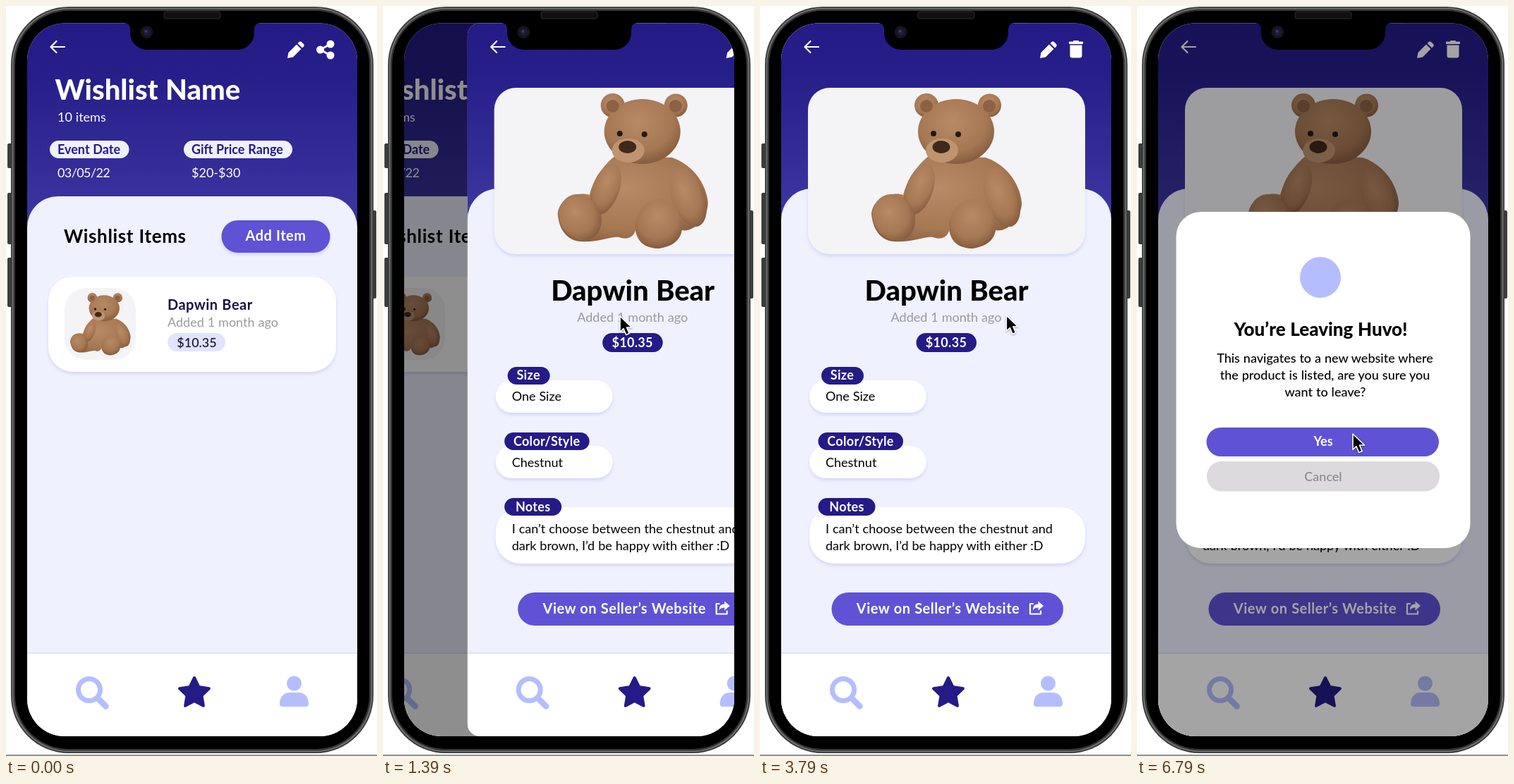
An HTML page that plays this animation: 526 by 1064 pixels, repeating every 6.82 s.

```html
<!DOCTYPE html>
<html lang="en">
<head>
<meta charset="utf-8">
<title>Wishlist app</title>
<style>
html, body { margin: 0; width: 100%; height: 100%; overflow: hidden; background: #fff; }
svg { display: block; width: 100%; height: 100%; }
text { font-family: Lato, "Open Sans", sans-serif; font-size: 18px; word-spacing: .02em; }
.b { font-weight: 700; }
.h { font-weight: 800; }
.m { font-weight: 500; }
.tag { letter-spacing: .02em; }
.t20 { font-size: 20px; letter-spacing: .024em; }
.t26 { font-size: 26px; letter-spacing: .024em; }
.t40 { font-size: 40px; }
.mid { text-anchor: middle; }
.white { fill: #fff; }
.navy { fill: #241b87; }
.ink { fill: #18123f; }
.grey { fill: #9a999c; }
.pale { fill: #eff1ff; }
.violet { fill: #5f52d5; }
.photo { fill: #f4f3f6; }
.soft { fill: #b4beff; }
.line { fill: none; stroke: #fff; stroke-linecap: round; stroke-linejoin: round; }
.lift { filter: drop-shadow(0 3px 2px rgba(85, 80, 205, .16)); }
</style>
</head>
<body>
<svg viewBox="0 0 526 1064" preserveAspectRatio="none">
<defs>
  <linearGradient id="sky" x1="0" y1="0" x2="0" y2="1">
    <stop offset="0" stop-color="#241b87"/><stop offset=".25" stop-color="#261e89"/><stop offset="1" stop-color="#3e38a4"/>
  </linearGradient>
  <radialGradient id="fur" cx=".45" cy=".35" r=".7">
    <stop offset="0" stop-color="#b98a66"/><stop offset=".65" stop-color="#a57753"/><stop offset="1" stop-color="#80563a"/>
  </radialGradient>
  <clipPath id="screen"><rect x="30" y="24.500" width="468" height="1011.500" rx="53"/></clipPath>
  <clipPath id="page"><rect x="30" y="24" width="468" height="1012" rx="18"/></clipPath>

  <g id="bear">
    <g fill="url(#fur)">
      <circle cx="236" cy="141" r="17"/><circle cx="325.500" cy="141" r="16.500"/>
      <path d="M240 212C222 226 208 248 203 268C190 263 160 270 158 295C160 318 172 333 190 334C215 336 235 326 245 328
        C262 334 268 322 268 318C272 338 285 345 305 343C325 340 333 328 334 318C350 322 372 300 371 278C368 252 350 225 320 215z"/>
      <ellipse cx="226" cy="260" rx="19" ry="38" transform="rotate(20 226 260)"/>
      <ellipse cx="343" cy="272" rx="23" ry="43" transform="rotate(-20 343 272)"/>
      <ellipse cx="190" cy="300" rx="29" ry="34" transform="rotate(-28 190 300)"/>
      <ellipse cx="300.500" cy="309" rx="32" ry="35" transform="rotate(14 300 309)"/>
      <ellipse cx="278" cy="178" rx="54" ry="46"/>
    </g>
    <circle cx="236" cy="142" r="9" fill="#8c6144"/><circle cx="325" cy="142" r="9" fill="#8c6144"/>
    <ellipse cx="258" cy="205" rx="23" ry="17" fill="#c0946f"/>
    <ellipse cx="257" cy="200" rx="12.500" ry="9" fill="#3f291d"/>
    <circle cx="246" cy="181" r="4" fill="#231914"/><circle cx="281" cy="182" r="4" fill="#231914"/>
  </g>

  <path id="back" class="line" stroke-width="2.200" d="M83 58H64M71.500 50L63.500 58l8 8"/>
  <g id="pencil" class="white">
    <path d="M0 24l1.500-8L13 4.500l6.500 6.500L8 22.500z"/>
    <path d="M14.500 3l2-2a2.500 2.500 0 0 1 3.500 0l3 3a2.500 2.500 0 0 1 0 3.500l-2 2z"/>
  </g>
  <g id="nav">
    <rect x="30" y="917" width="468" height="119" class="white"/>
    <rect x="30" y="917" width="468" height="2" fill="#dfe2fb"/>
    <circle cx="118" cy="970" r="15.500" fill="none" stroke="#b4beff" stroke-width="7"/>
    <path d="M130 982l11.500 11.500" stroke="#b4beff" stroke-width="8.500" stroke-linecap="round"/>
    <path transform="translate(267 975)" class="navy" stroke="#241b87" stroke-width="4" stroke-linejoin="round"
      d="M0-22L6.500-8.900 20.900-6.800 10.500 3.400 12.900 17.800 0 11-12.900 17.800-10.500 3.400-20.900-6.800-6.500-8.900z"/>
    <circle cx="408.500" cy="961" r="10.500" class="soft"/>
    <path class="soft" d="M388 990c0-10 6-16 14-16h13c8 0 14 6 14 16q0 4-4 4h-33q-4 0-4-4z"/>
  </g>
</defs>

<!-- phone body -->
<g>
  <rect y="1062" width="526" height="2" fill="#929292"/>
  <g fill="#3b3d3d">
    <rect x="2" y="195" width="7" height="35" rx="2"/><rect x="2" y="265" width="7" height="73" rx="2"/>
    <rect x="2" y="357" width="7" height="70" rx="2"/><rect x="519" y="290" width="6" height="125" rx="2"/>
  </g>
  <rect x="7" y="1" width="514" height="1059" rx="82" fill="#343635"/>
  <rect x="9.500" y="3.500" width="509" height="1054" rx="80" fill="none" stroke="#70716e" stroke-width="2"/>
  <rect x="13" y="7" width="502" height="1047" rx="76"/>
  <rect x="224" y="8" width="80" height="10" rx="3" fill="#101011" stroke="#2d2d2f"/>
</g>

<g clip-path="url(#screen)">
  <g id="list">
    <rect x="30" y="24" width="468" height="1012" class="pale"/>
    <rect x="30" y="24" width="468" height="296" fill="url(#sky)"/>
    <path class="pale" d="M30 314a44 44 0 0 1 44-44h380a44 44 0 0 1 44 44v604H30z"/>
    <use href="#back"/>
    <use href="#pencil" x="399" y="50"/>
    <g class="white">
      <circle cx="460" cy="54" r="5.500"/><circle cx="445.500" cy="62" r="5.500"/><circle cx="460" cy="70" r="5.500"/>
      <path class="line" stroke-width="3" d="M460 54l-14.500 8 14.500 8"/>
      <text x="69.500" y="133" class="h t40">Wishlist Name</text>
      <text x="73" y="164">10 items</text>
      <text x="73" y="243" letter-spacing="-.6">03/05/22</text>
      <text x="263" y="243">$20-$30</text>
    </g>
    <rect x="62" y="191" width="112.500" height="25" rx="12.500" class="pale"/>
    <rect x="252" y="191" width="154" height="25" rx="12.500" class="pale"/>
    <text x="73" y="210" class="b navy">Event Date</text>
    <text x="263" y="210" class="b navy">Gift Price Range</text>
    <text x="82" y="336" class="b t26">Wishlist Items</text>
    <rect x="305.500" y="304" width="154" height="46" rx="23" class="violet lift"/>
    <text x="382.500" y="333" class="b t20 white mid">Add Item</text>
    <rect x="60" y="384" width="408" height="135" rx="35" class="white lift"/>
    <rect x="83" y="400" width="101" height="102" rx="31" class="photo"/>
    <use href="#bear" transform="translate(27.500 357.200) scale(.402)"/>
    <text x="229" y="431" class="b t20 ink">Dapwin Bear</text>
    <text x="229" y="455" class="grey">Added 1 month ago</text>
    <rect x="229" y="464" width="82" height="26" rx="13" fill="#e1e4fc"/>
    <text x="270.500" y="484" class="m ink mid">$10.35</text>
    <use href="#nav"/>
  </g>
  <rect id="shade" x="30" y="24" width="468" height="1012" opacity="0"/>

  <g id="detail">
    <g clip-path="url(#page)">
      <rect x="30" y="24" width="468" height="1012" class="pale"/>
      <rect x="30" y="24" width="468" height="286" fill="url(#sky)"/>
      <path class="pale" d="M30 303a44 44 0 0 1 44-44h380a44 44 0 0 1 44 44v615H30z"/>
      <use href="#back"/>
      <use href="#pencil" x="397" y="50"/>
      <g class="white" transform="translate(438 49)">
        <rect x="6" width="8" height="3" rx="1"/><rect y="1.500" width="20" height="3.500" rx="1"/>
        <path d="M1.500 6.500h17v15a3 3 0 0 1-3 3h-11a3 3 0 0 1-3-3z"/>
      </g>
      <rect x="68" y="116" width="393" height="236" rx="31" class="photo lift"/>
      <use href="#bear"/>
      <text x="264.500" y="418" class="h t40 mid">Dapwin Bear</text>
      <text x="264" y="448" class="grey mid">Added 1 month ago</text>
      <g class="white">
        <rect x="70" y="531" width="166" height="46" rx="23" class="lift"/>
        <rect x="70" y="624" width="166" height="46" rx="23" class="lift"/>
        <rect x="70" y="711" width="391" height="80" rx="35" class="lift"/>
      </g>
      <g class="navy">
        <rect x="221.500" y="464" width="85.500" height="27" rx="13.500"/>
        <rect x="87" y="512" width="60" height="25" rx="12.500"/>
        <rect x="82.500" y="605" width="120.500" height="25" rx="12.500"/>
        <rect x="82.500" y="698" width="81" height="25" rx="12.500"/>
      </g>
      <g class="white b mid tag">
        <text x="264" y="484">$10.35</text>
        <text x="116.500" y="530">Size</text>
        <text x="142.500" y="624">Color/Style</text>
        <text x="123" y="717">Notes</text>
      </g>
      <text x="93" y="560">One Size</text>
      <text x="93" y="654">Chestnut</text>
      <text x="93" y="748">I can’t choose between the chestnut and</text>
      <text x="93" y="772">dark brown, I’d be happy with either :D</text>
      <rect x="101.500" y="832" width="328.500" height="47" rx="23.500" class="violet"/>
      <text x="252.500" y="862" class="b t20 white mid">View on Seller’s Website</text>
      <path class="line" stroke-width="2.200" d="M387 848h-4v14.500h15v-4"/>
      <path class="white" d="M394.500 844.500l7.500 6.500-7.500 6.500v-4c-4 0-6 1-7.500 4 0-6 2-9 7.500-9z"/>
      <use href="#nav"/>
    </g>
  </g>

  <g id="modal" opacity="0">
    <rect x="30" y="24" width="468" height="1012" opacity=".355"/>
    <rect x="55.500" y="292" width="417" height="477" rx="35" class="white"/>
    <circle cx="260" cy="385" r="29" class="soft"/>
    <g class="mid">
      <text x="260.500" y="468" class="h" style="font-size: 26px">You’re Leaving Huvo!</text>
      <g class="m">
        <text x="266.500" y="506">This navigates to a new website where</text>
        <text x="266.500" y="530">the product is listed, are you sure you</text>
        <text x="267" y="554">want to leave?</text>
      </g>
      <rect x="98.500" y="598" width="329.500" height="41" rx="20.500" class="violet"/>
      <rect x="99" y="646" width="330" height="42.500" rx="20.500" fill="#dcdadd"/>
      <text x="264" y="624" class="b white">Yes</text>
      <text x="264" y="674" class="m" fill="#8b898d">Cancel</text>
    </g>
  </g>
</g>

<!-- notch and camera -->
<path d="M168 24h192q-8 1-8 9v5a24 24 0 0 1-24 24H200a24 24 0 0 1-24-24v-5q0-8-8-9z"/>
<circle cx="199.500" cy="37" r="9" fill="#15151d"/>
<circle cx="199.500" cy="37" r="5" fill="#1d1c3e"/>
<circle cx="198.500" cy="36" r="1.800" fill="#3d3b7c"/>

<path id="cursor" d="M0 0v22.500l5-4.800 3.700 8.800 4.500-1.900-3.700-8.600h7z" stroke="#fff" stroke-width="1.600"
  stroke-linejoin="round" style="filter: drop-shadow(0 1.500px 1px rgba(0,0,0,.35))"/>
</svg>
<script>
const LOOP = 6820, WIDTH = 467;
const el = id => document.getElementById(id);
const [list, shade, detail, modal, cursor] = ["list", "shade", "detail", "modal", "cursor"].map(el);

// time, x, y of the pointer tip
const path = [
  [250, 534, 530], [950, 336, 440], [1750, 336, 440], [2450, 392, 250], [3090, 388, 246],
  [3480, 388, 246], [4300, 268, 844], [4560, 268, 844], [4860, 268, 856], [5400, 268, 856], [6150, 306, 607]
];

const span = (t, start, length) => Math.min(1, Math.max(0, (t - start) / length));
const smooth = p => p * p * (3 - 2 * p);

// cubic-bezier(0, 0, .58, 1)
function easeOut(p) {
  let lo = 0, hi = 1;
  for (let i = 0; i < 20; i++) {
    const s = (lo + hi) / 2;
    if (1.74 * s * s - .74 * s ** 3 < p) lo = s; else hi = s;
  }
  return smooth(hi);
}

function pointer(t) {
  let i = 0;
  while (i < path.length - 2 && t >= path[i + 1][0]) i++;
  const [t0, x0, y0] = path[i], [t1, x1, y1] = path[i + 1];
  const p = smooth(span(t, t0, t1 - t0));
  return [x0 + (x1 - x0) * p, y0 + (y1 - y0) * p];
}

const move = (node, x, y = 0) => node.setAttribute("transform", `translate(${x.toFixed(2)} ${y.toFixed(2)})`);

function draw(t) {
  const slide = t < 1256 ? 0 : easeOut(span(t, 1256, 216));
  move(list, -WIDTH * .254 * slide);
  move(detail, WIDTH * (1 - slide));
  shade.setAttribute("opacity", .55 * slide);
  detail.style.display = slide ? "" : "none";
  modal.setAttribute("opacity", easeOut(span(t, 4980, 200)));
  move(cursor, ...pointer(t));
}

const begin = performance.now();
function tick() {
  draw((performance.now() - begin) % LOOP);
  requestAnimationFrame(tick);
}
draw(0);
requestAnimationFrame(tick);
</script>
</body>
</html>
```
